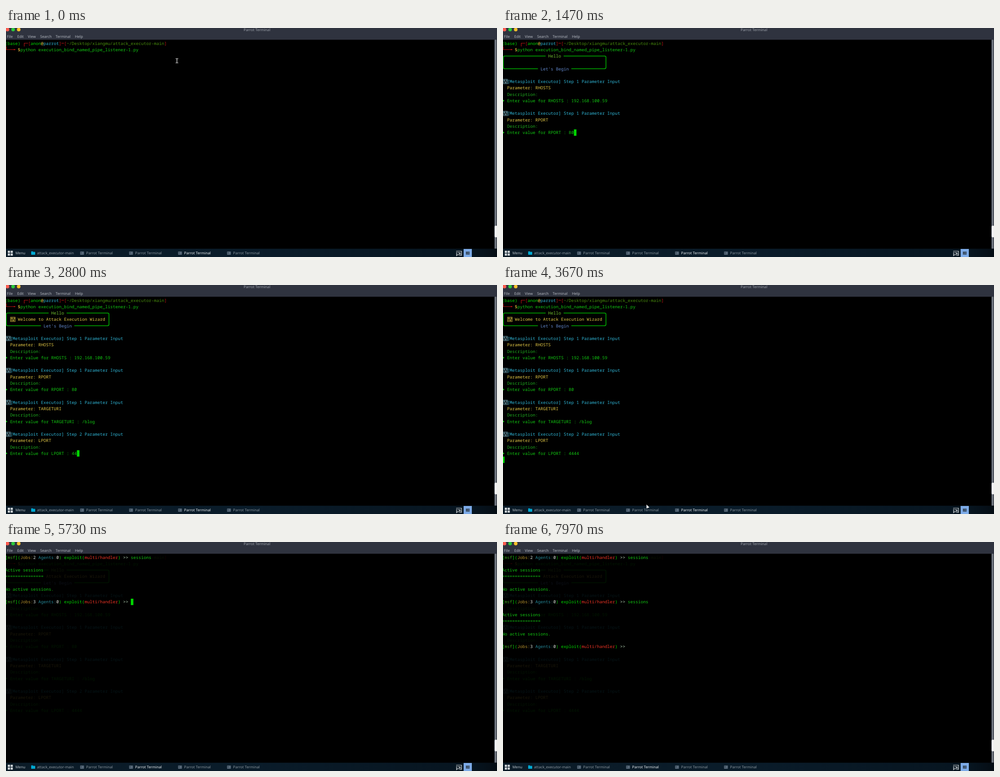
An HTML page with a canvas that plays this animation: 1093x512 px, repeating every 8 s.

```html
<!DOCTYPE html>
<html lang="en">
<head>
<meta charset="utf-8">
<title>Terminal</title>
<style>
html, body { margin: 0; width: 100%; height: 100%; overflow: hidden; background: #000; }
canvas { display: block; }
</style>
</head>
<body>
<canvas id="stage" width="1093" height="512"></canvas>
<script>
const ctx = document.getElementById('stage').getContext('2d');
const LOOP = 8000, SWITCH = 3700;
const CW = 5.717, LH = 14.27, X0 = -2.3, TOP = 26.9;
const GREEN = '#12c912', BRIGHT = '#00d800', RED = '#c01414', YELLOW = '#e2c846',
      CYAN = '#2fb4d4', WHITE = '#dce4dc';
const colX = c => X0 + c * CW;
const midY = r => TOP + (r + .5) * LH;

function rect(x, y, w, h, color, radius = 0) {
  ctx.fillStyle = color;
  ctx.beginPath();
  ctx.roundRect(x, y, w, h, radius);
  ctx.fill();
}

function line(color, width, ...pts) {
  ctx.strokeStyle = color;
  ctx.lineWidth = width;
  ctx.beginPath();
  pts.forEach(([x, y], i) => i ? ctx.lineTo(x, y) : ctx.moveTo(x, y));
  ctx.stroke();
}

// Monospaced cells: runs are [color, text] pairs; returns the next column
function cells(row, col, ...runs) {
  ctx.font = '9.53px "Noto Sans Mono", monospace';
  for (const [color, text] of runs) {
    ctx.fillStyle = color;
    for (const ch of text) {
      if (ch !== ' ') ctx.fillText(ch, colX(col), TOP + row * LH + 10.6);
      col++;
    }
  }
  return col;
}

function label(text, x, y, color) {
  ctx.font = '8.13px "Noto Sans", sans-serif';
  ctx.fillStyle = color;
  ctx.fillText(text, x, y);
}

function block(row, col) {
  rect(colX(col), TOP + row * LH, CW, LH, BRIGHT);
}

// Missing-glyph box with two rows of tiny digits
function missing(x, row, color) {
  const y = midY(row) - 5.5;
  ctx.strokeStyle = color;
  ctx.lineWidth = .8;
  ctx.strokeRect(x + .5, y + .5, 10.5, 10);
  for (let i = 0; i < 6; i++)
    ctx.strokeRect(x + 2.2 + i % 3 * 3, y + 2 + (i > 2) * 4.3, i % 2 ? .4 : 1.4, 2.6);
}

function typed(text, t, start, rate) {
  return text.slice(0, Math.max(0, Math.floor((t - start) / rate) + 1));
}

// step, parameter, value, shown at, typing starts at, ms per key
const steps = [
  [1, 'RHOSTS', '192.168.100.59', 450, 560, 45],
  [1, 'RPORT', '80', 1220, 1350, 70],
  [1, 'TARGETURI', '/blog', 1700, 1850, 70],
  [2, 'LPORT', '4444', 2450, 2650, 120]
];

function wizardBox(t) {
  const top = midY(2), bottom = midY(4), right = colX(40.5), left = .7;
  ctx.strokeStyle = BRIGHT;
  ctx.lineWidth = 1.3;
  ctx.beginPath();
  ctx.moveTo(colX(17), top);
  ctx.arcTo(left, top, left, bottom, 3);
  ctx.arcTo(left, bottom, right, bottom, 3);
  ctx.lineTo(colX(14), bottom);
  ctx.moveTo(colX(27), bottom);
  ctx.arcTo(right, bottom, right, top, 3);
  ctx.arcTo(right, top, left, top, 3);
  ctx.lineTo(colX(24), top);
  ctx.stroke();
  cells(2, 18, ['#70c030', 'Hello']);
  cells(4, 15, ['#6288cc', "Let's Begin"]);
  if (t >= 2000) {
    missing(9.5, 3, YELLOW);
    cells(3, 5, [YELLOW, 'Welcome to Attack Execution Wizard']);
  }
}

function wizard(t, cursor) {
  cells(0, 0, [BRIGHT, '(base)']);
  cells(0, 9, [RED, '['], [BRIGHT, 'anon'], [YELLOW, '@'], [CYAN, 'parrot'], [RED, ']'],
    [RED, ' ['], ['#488c0c', '~/Desktop/xiangmu/attack_executor-main'], [RED, ']']);
  const y0 = midY(0), y1 = midY(1);
  line(RED, 1.1, [colX(7.5), TOP + LH], [colX(7.5), y0], [colX(9), y0]);
  line(RED, 1.1, [colX(22), y0], [colX(23), y0]);
  line(RED, 1.1, [.6, TOP + LH], [.6, y1], [colX(4), y1]);
  line(RED, 2, [colX(3.4), y1], [colX(4), y1]);
  cells(1, 5, ['#f0d040', '$'], [GREEN, 'python execution_bind_named_pipe_listener-1.py']);
  if (t >= 300) wizardBox(t);

  let at = null;
  steps.forEach(([n, name, value, shown, start, rate], i) => {
    if (t < shown) return;
    const row = 6 + i * 5, y = midY(row + 3);
    missing(-1, row, '#7cb4c4');
    cells(row, 2, [CYAN, `[Metasploit Executor] Step ${n} Parameter Input`]);
    cells(row + 1, 2, [YELLOW, 'Parameter: ' + name]);
    cells(row + 2, 2, ['#1fae1f', 'Description:']);
    ctx.fillStyle = GREEN;
    ctx.beginPath();
    ctx.moveTo(0, y - 2.2);
    ctx.lineTo(3.2, y);
    ctx.lineTo(0, y + 2.2);
    ctx.fill();
    at = [row + 3, cells(row + 3, 2, [GREEN, `Enter value for ${name} : ` + typed(value, t, start, rate)])];
  });
  if (t >= 3200) at = [25, 0];
  if (cursor && at) block(...at);
}

// Text that also clears the cells beneath it
function printed(row, ...runs) {
  const length = runs.reduce((n, run) => n + run[1].length, 0);
  rect(0, TOP + row * LH, colX(length), LH, '#000');
  return cells(row, 0, ...runs);
}

function prompt(row, jobs, command) {
  return printed(row, [BRIGHT, '['], ['#3c9a1c', 'msf'], [BRIGHT, ']('],
    ['#b8942c', 'Jobs:'], [WHITE, jobs], ['#258898', ' Agents:'], [WHITE, '0'],
    [BRIGHT, ') exploit('], ['#f03424', 'multi/handler'], [BRIGHT, ')'],
    ['#b8d8b8', ' >> '], [GREEN, command]);
}

function listing(row) {
  printed(row, [GREEN, 'Active sessions']);
  printed(row + 1, [GREEN, '='.repeat(15)]);
  printed(row + 3, [GREEN, 'No active sessions.']);
}

function sessions(t) {
  ctx.globalAlpha = .11;
  wizard(3300, false);
  ctx.globalAlpha = 1;
  prompt(0, '2', 'sessions');
  listing(2);
  let row = 7, col = prompt(7, '3', typed('sessions', t, 6050, 95));
  if (t >= 7400) {
    listing(9);
    row = 14;
    col = prompt(14, '3', '');
  }
  if (t >= 5000 && t < 7700) block(row, col);
}

function termIcon(x, color) {
  rect(x, 499.7, 8.6, 7.2, color, .8);
  line('#0b1822', .9, [x + 1.5, 501.5], [x + 3, 502.8], [x + 1.5, 504]);
}

function chrome(active) {
  rect(0, 0, 1093, 26.3, '#2f333f');
  ['#ff5c50', '#2ac83c', '#f8c02c'].forEach((c, i) => rect(-.7 + i * 12.5, -.5, 8, 8, c, 4));
  label('Parrot Terminal', 529, 6.7, '#a0a5ae');
  [['File', 2], ['Edit', 25], ['View', 48.5], ['Search', 76], ['Terminal', 110.5], ['Help', 153.5]]
    .forEach(([s, x]) => label(s, x, 21.8, '#b4b9c1'));

  rect(1086.5, 26.3, 6.5, 467.2, '#252a32');
  rect(1088, 26.3, 4, 467.2, '#70767f');
  rect(1087.7, 442, 5.6, 26, '#f2f2f2', 2);

  const bar = ctx.createLinearGradient(0, 0, 1093, 0);
  bar.addColorStop(0, '#0b1b27');
  bar.addColorStop(.5, '#0a1c2a');
  bar.addColorStop(.95, '#071520');
  bar.addColorStop(1, '#050d14');
  rect(0, 493.5, 1093, 18.5, bar);
  for (let i = 0; i < 4; i++)
    rect(4 + i % 2 * 6.3, 498 + (i > 1) * 6.1, 4.9, 4.9, '#ccd2d6');
  label('Menu', 21, 506.3, '#b9c1c8');
  rect(56, 499.3, 4.2, 3, '#0098c4', .8);
  rect(56, 500.5, 9, 6.6, '#00a9d2', .8);
  label('attack_executor-main', 69, 506.3, '#929ca5');
  for (let i = 0; i < 4; i++) {
    const x = 165 + i * 109;
    termIcon(x, '#566777');
    label('Parrot Terminal', x + 13.6, 506.3, i === active ? '#eef2f4' : '#8c979f');
  }

  const tray = '#e0e4e6';
  line(tray, 1.2, [1002, 499], [1014, 499], [1014, 508.5], [1009, 508.5]);
  line(tray, 1.2, [1003, 501], [1003, 509], [1006, 506]);
  line(tray, 1.2, [1005, 502.5], [1011, 502.5], [1007, 508]);
  line(tray, 1.2, [1009, 505.5], [1013, 505.5]);
  rect(1018.7, 494, 18.3, 18, '#7dabe8');
  termIcon(1023.6, '#465d79');
}

const path = [[0, 380, 73], [3370, 380, 73], [SWITCH, 318, 500], [4150, 524, 103], [LOOP, 524, 103]];

function pointer(t) {
  if (t >= 4900 || (t >= 500 && t < 3370)) return;
  const i = path.findIndex(p => p[0] > t);
  const [ta, xa, ya] = path[i - 1], [tb, xb, yb] = path[i];
  const k = (t - ta) / (tb - ta), e = k * k * (3 - 2 * k);
  const x = xa + (xb - xa) * e, y = ya + (yb - ya) * e;
  if (y > 490) {
    ctx.fillStyle = '#e8e8e8';
    ctx.beginPath();
    ctx.moveTo(x, y);
    ctx.lineTo(x + 6.5, y + 6.5);
    ctx.lineTo(x, y + 9);
    ctx.fill();
    return;
  }
  const c = '#c4c4c4';
  line(c, 1.6, [x + .5, y - 4.5], [x + .5, y + 5]);
  line(c, 1.2, [x - 2.5, y - 4.5], [x + 3.5, y - 4.5]);
  line(c, 1.2, [x - 2.5, y + 5], [x + 3.5, y + 5]);
}

function draw(t) {
  ctx.textRendering = 'geometricPrecision';
  rect(0, 0, 1093, 512, '#000');
  const second = t >= SWITCH;
  second ? sessions(t) : wizard(t, true);
  chrome(second ? 1 : 2);
  pointer(t);
}

const begin = performance.now();
function tick() {
  draw((performance.now() - begin) % LOOP);
  requestAnimationFrame(tick);
}
tick();
</script>
</body>
</html>
```
